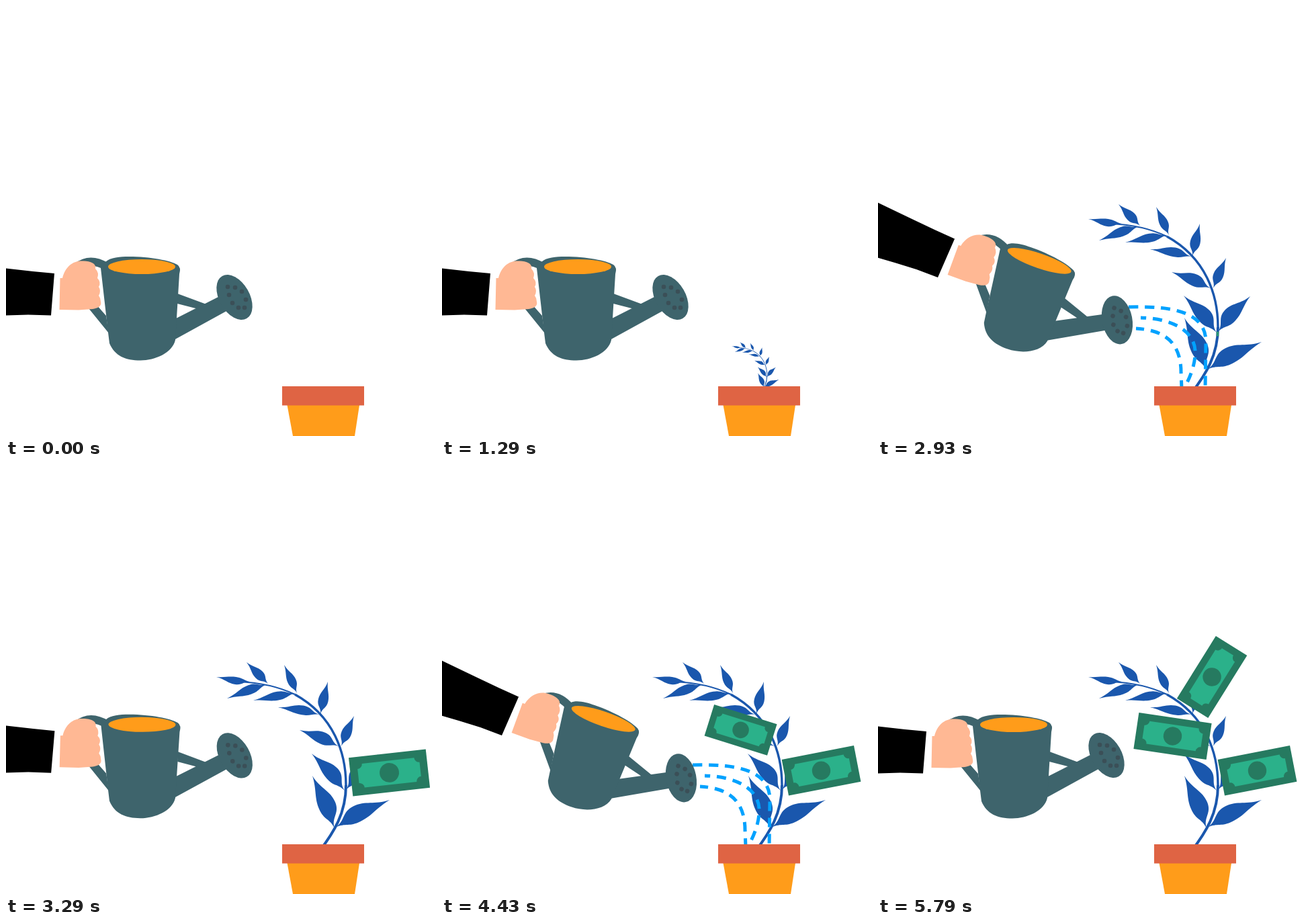
Animation, 640 px wide and 640 px high, one loop 6000 ms. Source, as an HTML page with a canvas:

```html
<!DOCTYPE html>
<html lang="en">
<head>
<meta charset="utf-8">
<title>Watering the money plant</title>
<style>
  html, body { margin: 0; width: 100%; height: 100%; overflow: hidden; background: #fff; }
  canvas { display: block; width: 100vmin; height: 100vmin; }
</style>
</head>
<body>
<canvas id="stage" width="640" height="640"></canvas>
<script>
const ctx = document.getElementById('stage').getContext('2d');
const LOOP = 6000, FPS = 14, LAST = 81;
const RAD = Math.PI / 180;
const TEAL = '#3e646c', HOLE = '#3b4f57', ORANGE = '#ff9c1a', RIM = '#df6444';
const SKIN = '#ffb894', LEAF = '#1a57ad', WATER = '#00a2ff';
const BILL = '#267a60', MINT = '#2bb18a';

const TILT = 19;
// start of tilt, start of return
const POURS = [[12, 940], [1947, 2960], [3798, 4825]];
const TILT_TIME = 350, RETURN_TIME = 330;

// base x, base y, tip x, tip y, left half-width, right half-width
const LEAVES = [
  [489, 542, 456, 464, 10, 16], [490, 541, 571, 500, 16, 9],
  [504, 486, 455, 431, 8, 14], [506, 485, 554, 432, 14, 8],
  [495, 420, 437, 396, 7, 11], [499, 420, 518, 375, 8, 7],
  [467, 373, 405, 362, 5, 9], [468, 372, 479, 324, 8, 7],
  [431, 341, 368, 352, 6, 7], [433, 341, 414, 299, 6, 7],
  [388, 328, 329, 349, 6, 8], [390, 327, 358, 295, 7, 7],
  [363, 324, 313, 317, 7, 4]
];

const BILLS = [
  { start: 2917, x: 564.5, y: 456.3, angle: -11, px: 507, py: 492, dir: -1 },
  { start: 4180, x: 438.5, y: 405, angle: 8.4, px: 498.5, py: 398.5, dir: 1 },
  { start: 4970, x: 496.8, y: 317, angle: -58.3, px: 470, py: 368, dir: -1 }
];
const BILL_TIME = 850, BILL_TURN = 85;

const STREAMS = [
  ['M373 448C445 446 488 458 488 500L487 570', 0],
  ['M391 464C440 465 475 485 472 520C471 535 465 552 457 566', 6],
  ['M384 480C425 482 451 500 451 545L452 570', 2]
].map(([d, offset]) => [new Path2D(d), offset]);

const SLEEVE = new Path2D('M-90 380L0 390.5L40 395L72 398L67 460.5L33 459.5L0 460.5L-90 465Z');
const HAND = new Path2D('M79.5 452L80.5 405L84 405C88 388 100 379 113 379.5C125 379 135 383 133 391' +
  'Q139 397 136 405Q142 411 138 418Q142 424 138 431Q141 435 141 440C143 447 136 450 129 451L108 452.5Z');
const BODY = new Path2D('M141 390L148 381C155 374 170 373 183 373C215 373 245 379 255 385Q261 389 258 399' +
  'L252 497C248 516 222 527.5 200 527.5C178 527.5 162 521 154 502L152 486Z');
const ARMS = new Path2D('M123 450L134 444L149 461L153 487Z' +
  'M255 428L301 445L290 452L255 443ZM253 465L318 432L330 453L250 497Z');
const HANDLE = new Path2D('M106 388Q125 373 150 388');
const HOLES = [[330, 418], [341, 419], [351, 425], [357, 437], [355, 449], [346, 449], [337, 442], [332, 430]];

const STEM = [
  ['M466 577C488 548 506 520 506 478', 4],
  ['M506 478C506 430 488 375 430 343', 3.4],
  ['M430 343C405 331 375 325 345 324', 2.2]
].map(([d, width]) => [new Path2D(d), width]);

const progress = (t, start, time) => Math.min(1, Math.max(0, (t - start) / time));
const backOut = x => 1 + 2.7 * (x - 1) ** 3 + 1.7 * (x - 1) ** 2;

function fill(color, path) {
  ctx.fillStyle = color;
  path ? ctx.fill(path) : ctx.fill();
}

function oval(color, x, y, rx, ry = rx, turn = 0) {
  ctx.beginPath();
  ctx.ellipse(x, y, rx, ry, turn * RAD, 0, 7);
  fill(color);
}

function about(x, y, turn, scale) {
  ctx.translate(x, y);
  ctx.rotate(turn * RAD);
  ctx.scale(scale, scale);
  ctx.translate(-x, -y);
}

// full belly, thin stalk, hollow taper to the tip
function leaf([bx, by, tx, ty, left, right]) {
  const dx = tx - bx, dy = ty - by, len = Math.hypot(dx, dy);
  const at = (u, v) => [bx + dx * u + dy / len * v, by + dy * u - dx / len * v];
  ctx.beginPath();
  ctx.moveTo(bx, by);
  ctx.bezierCurveTo(...at(.2, .1 * left), ...at(.2, left), ...at(.42, left));
  ctx.bezierCurveTo(...at(.64, left), ...at(.74, .2 * left), tx, ty);
  ctx.bezierCurveTo(...at(.74, -.2 * right), ...at(.64, -right), ...at(.42, -right));
  ctx.bezierCurveTo(...at(.2, -right), ...at(.2, -.1 * right), bx, by);
  fill(LEAF);
}

function plant(t) {
  const size = Math.sin(progress(t, 1134, 866) * Math.PI / 2);
  if (!size) return;
  ctx.save();
  about(475.5, 577, 0, size);
  ctx.strokeStyle = LEAF;
  for (const [path, width] of STEM) {
    ctx.lineWidth = width;
    ctx.stroke(path);
  }
  LEAVES.forEach(leaf);
  ctx.restore();
}

function bill(t, b) {
  if (t <= b.start) return;
  const p = backOut(progress(t, b.start, BILL_TIME));
  ctx.save();
  about(b.px, b.py, b.dir * BILL_TURN * (1 - p), p);
  ctx.translate(b.x, b.y);
  ctx.rotate(b.angle * RAD);
  ctx.fillStyle = BILL;
  ctx.fillRect(-54.7, -27.3, 109.4, 54.6);
  // panel with scooped corners
  const w = 44, h = 17;
  ctx.beginPath();
  [[-w, -h, 90], [w, -h, 180], [w, h, 270], [-w, h, 360]].forEach(([x, y, a]) =>
    ctx.arc(x, y, 7, a * RAD, (a - 90) * RAD, true));
  fill(MINT);
  oval(BILL, 0, 0, 13.7);
  ctx.restore();
}

function water(t) {
  for (const [start, end] of POURS) {
    const far = 175 * progress(t, start + TILT_TIME, 200);
    const near = 175 * progress(t, end, 120);
    if (far <= near) continue;
    ctx.save();
    ctx.beginPath();
    ctx.arc(372, 465, far, 0, 7);
    ctx.closePath();
    ctx.moveTo(372 + near, 465);
    ctx.arc(372, 465, near, 0, 7);
    ctx.clip('evenodd');
    ctx.strokeStyle = WATER;
    ctx.lineWidth = 5;
    ctx.setLineDash([14, 10]);
    for (const [path, offset] of STREAMS) {
      ctx.lineDashOffset = offset;
      ctx.stroke(path);
    }
    ctx.restore();
  }
}

function pot() {
  fill(ORANGE, new Path2D('M418.5 594H526L519 640H427Z'));
  ctx.fillStyle = RIM;
  ctx.fillRect(411, 566, 122, 28.5);
}

function wateringCan(t) {
  const tilt = POURS.reduce((sum, [start, end]) =>
    sum + progress(t, start, TILT_TIME) - progress(t, end, RETURN_TIME), 0);
  ctx.save();
  about(247, 498, TILT * tilt, 1);
  ctx.strokeStyle = TEAL;
  ctx.lineWidth = 12;
  ctx.stroke(HANDLE);
  fill(TEAL, ARMS);
  fill(TEAL, BODY);
  oval(ORANGE, 202, 388, 50, 11);
  oval(TEAL, 340, 433.5, 22.5, 36.5, -30);
  HOLES.forEach(([x, y]) => oval(HOLE, x, y, 3.3));
  fill(SKIN, HAND);
  fill('#000', SLEEVE);
  ctx.restore();
}

function draw(now) {
  const step = Math.min(LAST, Math.floor((now % LOOP + 5) * FPS / 1000));
  const t = step * 1000 / FPS;
  ctx.fillStyle = '#fff';
  ctx.fillRect(0, 0, 640, 640);
  plant(t);
  BILLS.forEach(b => bill(t, b));
  water(t);
  pot();
  wateringCan(t);
}

const begin = performance.now();
function tick() {
  draw(performance.now() - begin);
  requestAnimationFrame(tick);
}
tick();
</script>
</body>
</html>
```
